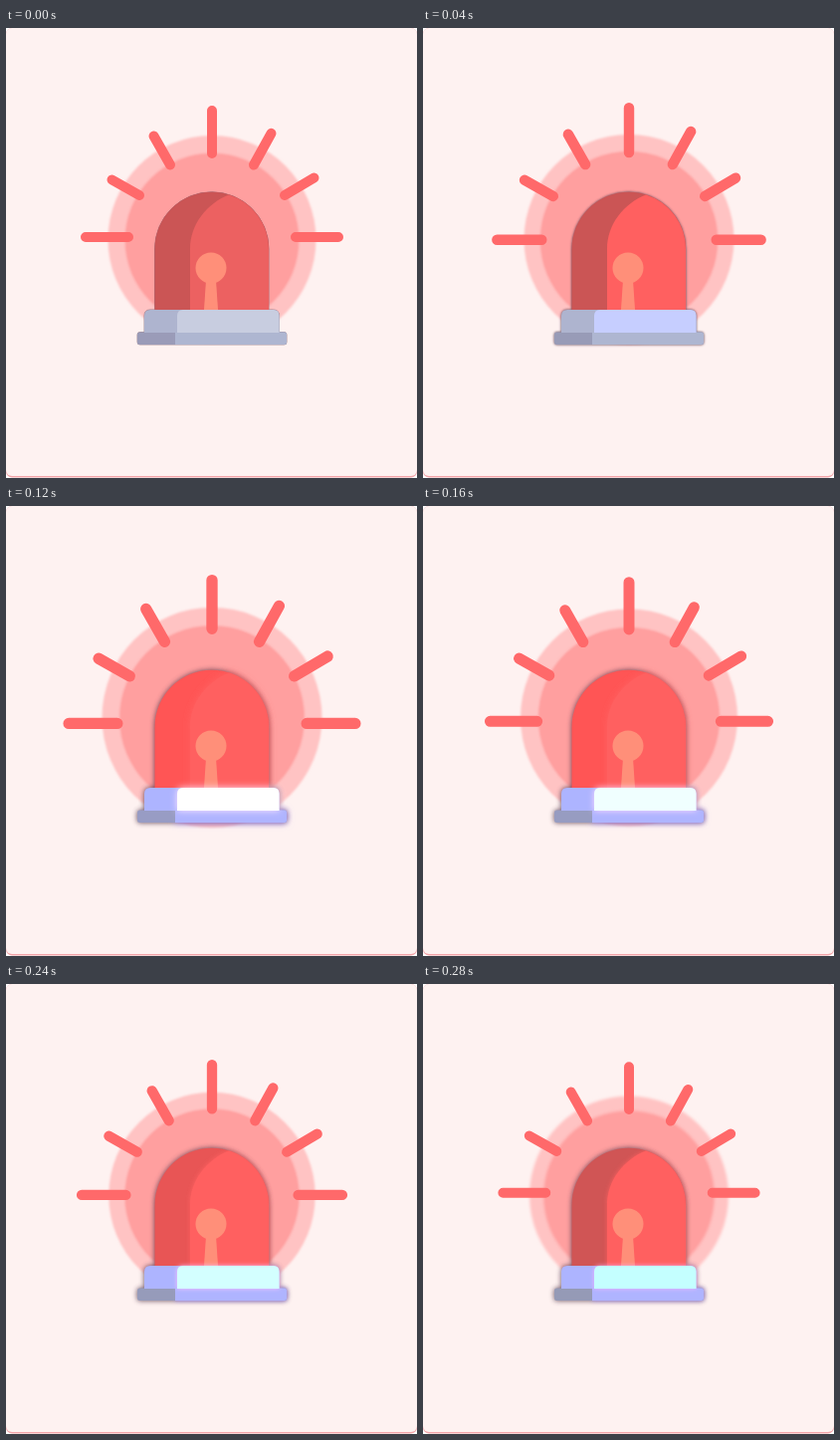
Write an HTML page that moves like this. It is 413 by 452 pixels and loops after 320 ms.

```html
<!DOCTYPE html>
<html lang="en">
<head>
<meta charset="utf-8">
<title>Siren</title>
<style>
html, body { margin: 0; width: 100%; height: 100%; overflow: hidden; background: #fff; }
svg { display: block; width: 100%; height: 100%; }
</style>
</head>
<body>
<svg viewBox="0 0 413 452">
  <defs>
    <filter id="haloBlur" x="-20%" y="-20%" width="140%" height="140%"><feGaussianBlur stdDeviation="1"/></filter>
    <filter id="shadowBlur" x="-20%" y="-20%" width="140%" height="140%"><feGaussianBlur stdDeviation="0"/></filter>
    <filter id="glowBlur" x="-30%" y="-70%" width="160%" height="240%"><feGaussianBlur stdDeviation="0"/></filter>
    <path id="dome" d="M149.5 283V222a57.25 57.25 0 0 1 114.5 0V283z"/>
    <path id="lit" d="M185 283V222C185 197 202 176 224 167.4A57.25 57.25 0 0 1 264 222V283z"/>
    <path id="step" d="M139 306V289q0-6 6-6H268.500q6 0 6 6V306z"/>
    <path id="stepLit" d="M172 306V289q0-6 6-6H268.500q6 0 6 6V306z"/>
    <rect id="foot" x="132" y="305.500" width="150" height="12.500" rx="2.500"/>
    <path id="footLit" d="M170 305.500H279.500q2.500 0 2.500 2.500V315.500q0 2.500-2.500 2.500H170z"/>
  </defs>
  <rect width="413" height="451.500" rx="6" fill="#f3a5aa"/>
  <rect width="413" height="450" rx="6" fill="#fef2f1"/>
  <g filter="url(#haloBlur)">
    <circle id="outer" cx="207" cy="212.500" fill="#ffc3c3"/>
    <circle id="inner" cx="207" cy="213" fill="#ff9f9f"/>
  </g>
  <path id="rays" fill="none" stroke="#ff696a" stroke-width="10" stroke-linecap="round"
    d="M80 210H123M291 210H334M207 83V126M148.500 108.500L165 137.500M266.500 105.800L249 137.500M106.500 152.500L134 168M309.500 150.500L280 168"/>
  <g id="shadow" fill="#54384c" stroke="#54384c" filter="url(#shadowBlur)">
    <use href="#dome"/><use href="#step"/><use href="#foot"/>
  </g>
  <use id="footGlow" href="#footLit" fill="#a58cff" filter="url(#glowBlur)"/>
  <use id="domeFill" href="#dome"/>
  <use id="litGlow" href="#lit" fill="#ff6060" filter="url(#glowBlur)"/>
  <use id="litFill" href="#lit"/>
  <g fill="#ff8f79">
    <circle cx="206" cy="241" r="15.500"/>
    <path d="M201 253H211L213 283H199z"/>
  </g>
  <use id="footFill" href="#foot"/>
  <use id="footLitFill" href="#footLit"/>
  <use id="stepFill" href="#step"/>
  <use id="stepGlow" href="#stepLit" filter="url(#glowBlur)"/>
  <use id="stepLitFill" href="#stepLit"/>
</svg>
<script>
const LOOP = 320, STEP = 40;
const $ = id => document.getElementById(id);
const set = (id, name, value) => $(id).setAttribute(name, value);
const mix = (a, b, k) => a + (b - a) * k;

// Linear interpolation over [position, value] pairs; values are numbers or hex colours.
function track(keys, x) {
  let i = 0;
  while (i < keys.length - 2 && x > keys[i + 1][0]) i++;
  const [x0, a] = keys[i], [x1, b] = keys[i + 1];
  const k = Math.min(1, Math.max(0, (x - x0) / (x1 - x0)));
  if (typeof a === 'number') return mix(a, b, k);
  const part = (c, n) => parseInt(c.slice(1 + 2 * n, 3 + 2 * n), 16);
  return `rgb(${[0, 1, 2].map(n => Math.round(mix(part(a, n), part(b, n), k)))})`;
}

const motion = {
  outer: [[0, 104.5], [2, 106.5], [3, 110.5], [5, 107.5], [7, 100]],
  inner: [[0, 87.5], [3, 93], [7, 86]],
  scale: [[0, 1], [3, 1.133], [7, 0.997]],
  power: [[0, 0], [3, 3], [7, 2]]
};

// Colours by lamp power, 0 (off) to 3 (full).
const fills = {
  domeFill: [[0, '#cb5555'], [1, '#cb5555'], [2, '#d05555'], [2.5, '#ff5555'], [3, '#ff5555']],
  litFill: [[0, '#ec6161'], [1, '#ff6060']],
  stepFill: [[0, '#aeb4cf'], [1, '#aeb4cf'], [2, '#adb4ff']],
  stepLitFill: [[0, '#c8cde0'], [1, '#c6ceff'], [2, '#c4ffff'], [3, '#ffffff']],
  footFill: [[0, '#9a9bb8'], [2, '#959ab6'], [3, '#989cc4']],
  footLitFill: [[0, '#aeb6d1'], [1, '#aeb6d1'], [2, '#afb4ff']],
  stepGlow: [[1, '#e6d8ff'], [2, '#ffb4ff'], [3, '#ffe4ff']]
};

function draw(time) {
  const f = Math.floor((time % LOOP) / STEP);
  const power = track(motion.power, f);
  const scale = track(motion.scale, f);
  const glow = Math.max(0, power - 1) / 2;

  set('outer', 'r', track(motion.outer, f));
  set('inner', 'r', track(motion.inner, f));
  set('rays', 'transform', `translate(207 146.5) scale(${scale}) translate(-207 -146.5)`);
  for (const id in fills) set(id, 'fill', track(fills[id], power));

  const blur = (id, size) => $(id).firstElementChild.setAttribute('stdDeviation', size);
  blur('haloBlur', track([[0, 0.8], [7, 1.4]], f));
  blur('shadowBlur', track([[0, 0], [1, 1.2], [2, 2.4], [3, 2.6]], power));
  blur('glowBlur', 0.5 + 3 * glow);
  set('shadow', 'opacity', track([[0, 0.5], [1, 0.75], [3, 0.8]], power));
  for (const id of ['footGlow', 'litGlow', 'stepGlow']) {
    set(id, 'opacity', Math.min(1, glow * 1.8));
  }
}

const start = performance.now();
function tick() {
  draw(performance.now() - start);
  requestAnimationFrame(tick);
}
tick();
</script>
</body>
</html>
```
